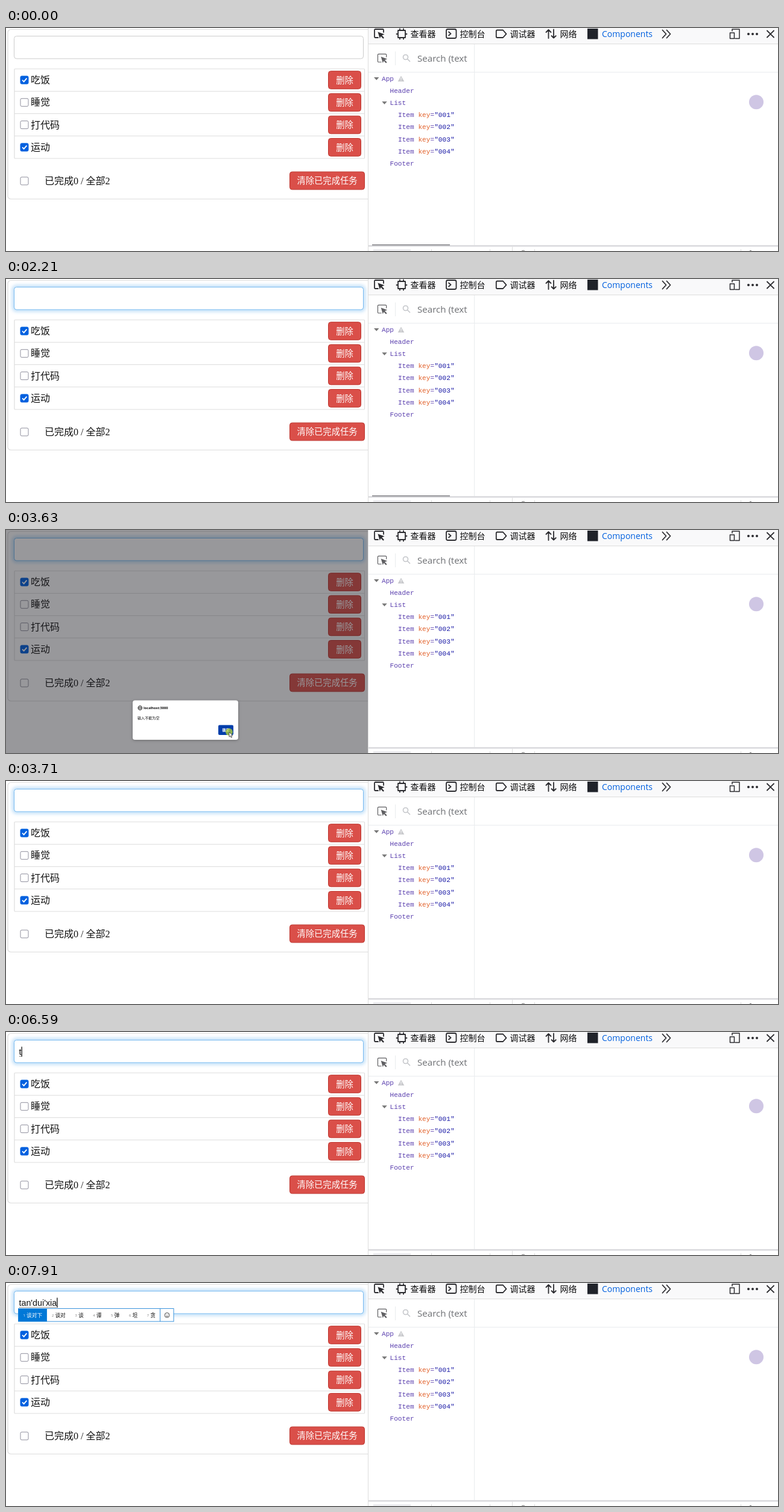
Animation, 1280 px wide and 371 px high, one loop 8000 ms. Source, as an HTML page:

```html
<!DOCTYPE html>
<html lang="zh">
<head>
<meta charset="utf-8">
<title>Todo list</title>
<style>
html, body { margin: 0; width: 100%; height: 100%; overflow: hidden; background: #fff; }
svg { display: block; }
text { white-space: pre; }
.page { font: 16px "Liberation Serif", "Noto Sans CJK SC", "Noto Sans CJK", serif; fill: #111; }
.ui { font: 14px "Open Sans", "Noto Sans CJK SC", "Noto Sans CJK", sans-serif; fill: #0c0c0d; }
.tree { font: 11.15px "Liberation Mono", monospace; fill: #5a3fae; }
.typed { font: 14.3px "Liberation Sans", sans-serif; fill: #111; }
.btn { fill: #da4f49; stroke: #bd362f; }
.btnText { font-size: 14.3px; fill: #fff; text-anchor: middle; }
.line { fill: none; stroke: #ddd; }
.icon { fill: none; stroke: #2b2b2f; stroke-width: 1.8; stroke-linejoin: round; stroke-linecap: round; }
.small { font-size: 6.1px; }
.cand { font-size: 8.7px; }
.num { font-size: 5.6px; }
</style>
</head>
<body>
<svg id="stage" width="1280" height="371" viewBox="0 0 1280 371">
  <defs>
    <filter id="glow" x="-5%" y="-50%" width="110%" height="200%"><feGaussianBlur stdDeviation="3"/></filter>
    <filter id="shadow" x="-10%" y="-20%" width="120%" height="150%"><feDropShadow dx="0" dy="1" stdDeviation="2.5" flood-opacity=".3"/></filter>
    <path id="picker" d="M7 15H2.5Q1 15 1 13.5V2.5Q1 1 2.5 1H14.500Q16 1 16 2.500V6" />
    <path id="pointer" d="M6.500 5.500L17.500 9.500 13.200 11.200 17 15.200 15.300 16.800 11.500 12.800 9.800 16.500Z" />
  </defs>

  <g id="page" class="page">
    <rect class="line" x="3" y="2.500" width="640" height="282" rx="5" style="stroke-width:1.200"/>
    <rect id="halo" x="13" y="13" width="580" height="38.500" rx="4" fill="none" stroke="#52a8ec" stroke-width="3" opacity="0" filter="url(#glow)"/>
    <rect id="field" x="13.500" y="13.500" width="579" height="37.500" rx="4" fill="#fff" stroke="#ccc"/>
    <rect class="line" x="14" y="68" width="580.500" height="149" rx="1" style="stroke-width:1.200"/>
    <path class="line" d="M14 105.300H594M14 142.500H594M14 179.700H594"/>
    <text x="64" y="259.500">已完成0 / 全部2</text>
  </g>
  <rect id="selection" x="22" y="23.500" width="28" height="17.500" fill="#0078d7"/>
  <text id="typed" class="typed" x="21.500" y="38"></text>
  <path id="underline" stroke="#333" stroke-dasharray="1 1"/>
  <rect id="caret" y="24.500" width="1.300" height="16.500" fill="#111"/>
  <g id="ime" class="ui"></g>

  <g id="modal" class="ui">
    <rect width="601" height="371" fill="#1c1b22" opacity=".45"/>
    <rect x="210" y="283.500" width="175" height="65.500" rx="4" fill="#fff" filter="url(#shadow)"/>
    <g fill="none" stroke="#222" stroke-width=".8">
      <circle cx="222.300" cy="296" r="3.500"/><ellipse cx="222.300" cy="296" rx="1.600" ry="3.500"/><path d="M218.800 296h7"/>
    </g>
    <text x="228" y="298.200" font-weight="700" style="font-size:5.700px">localhost:3000</text>
    <text class="small" x="218" y="315.300">输入不能为空</text>
    <rect id="ok" x="352" y="324.500" width="25" height="16.500" rx="2"/>
    <text class="small" x="364.500" y="335.200" text-anchor="middle" font-weight="700" style="fill:#fff">确定</text>
  </g>

  <g id="tools" class="ui">
    <rect x="601" width="679" height="371" fill="#fff"/>
    <rect x="601" width="679" height="26" fill="#f9f9fa"/>
    <path class="line" d="M601 26.500H1280M600.500 0V371"/>
    <path d="M601 73.500H1280M776.500 27V361M645.500 39V62" fill="none" stroke="#e9ebee"/>
    <path d="M601 362.500H1280" stroke="#d9d9dc" stroke-width="2.400"/>
    <rect x="609" y="368" width="62" height="3" fill="#ededf0"/>
    <path class="line" d="M705.500 368V371M802.500 368V371M876.500 368V371M1218.500 368V371M839.500 364V371"/>
    <path d="M855 371q2.500-2 5 0M1233 370.500h3" fill="none" stroke="#777"/>
    <rect id="scroll" x="607" y="360" width="129" height="1.600" fill="#85858a"/>

    <g transform="translate(610 1)"><use href="#picker" class="icon"/><use href="#pointer" fill="#2b2b2f"/></g>
    <g transform="translate(615.500 42.500) scale(.95)" opacity=".75"><use href="#picker" class="icon" style="stroke-width:1.300"/><use href="#pointer" fill="#2b2b2f"/></g>
    <g class="icon">
      <path d="M650 4H662V16H650ZM653 4V1.500M659 4V1.500M653 16V18.500M659 16V18.500M650 10H647.500M662 10H664.500"/>
      <rect x="730" y="2" width="16.500" height="15" rx="2.500"/><path d="M734 6.500L737.500 9.500 734 12.500"/>
      <path d="M814.500 3.500H824L829.500 9.800 824 16H814.500Q812.800 16 812.800 14.300V5.200Q812.800 3.500 814.500 3.500Z"/>
      <path d="M899.500 17V3M895.500 7L899.500 3 903.500 7M908 2.500V16.500M904.500 13L908 16.500 911.800 13"/>
      <path d="M1088.500 3.500L1094.500 10 1088.500 16.500M1095.500 3.500L1101.500 10 1095.500 16.500"/>
      <path d="M1204 5V2H1216V17.500H1209M1200.500 8H1207.500V17.500H1200.500Z" stroke-width="1.500"/>
      <path d="M1262 4.500L1273 15.500M1273 4.500L1262 15.500"/>
    </g>
    <g fill="#2b2b2f"><circle cx="1231" cy="10" r="2"/><circle cx="1238" cy="10" r="2"/><circle cx="1245" cy="10" r="2"/></g>
    <rect x="964" y="1" width="17.500" height="17.500" fill="#20232a"/>
    <circle cx="1244" cy="123.300" r="12" fill="#cfc6e4"/>
    <text x="670.500" y="15">查看器</text>
    <text x="752.500" y="15">控制台</text>
    <text x="835.500" y="15">调试器</text>
    <text x="918.500" y="15">网络</text>
    <text x="988" y="15" style="fill:#0060df">Components</text>
    <g fill="none" stroke="#c4c6ca" stroke-width="1.600"><circle cx="662.500" cy="48.500" r="4"/><path d="M665.500 51.500L670 56"/></g>
    <text x="682" y="56" style="font-size:15.100px;fill:#6d6f73">Search (text</text>
    <path d="M610 82H618.500L614.300 86.700ZM623.300 122.200H631.800L627.500 126.900Z" fill="#777"/>
    <path d="M655 79.500L660.300 89H649.700Z" fill="#c9cacd"/><path d="M655 82.500V86M655 87V88" stroke="#fff"/>
  </g>

  <circle id="click" r="6" fill="#b5d334" opacity=".75"/>
  <g id="mouse">
    <path id="arrow" d="M0 0V8.200L2 6.500 3.300 9.500 4.600 8.900 3.300 6H5.800Z" fill="#fff" stroke="#333" stroke-width=".8"/>
    <path id="beam" d="M-1.700 -4.300H1.700M0 -4.300V4.300M-1.700 4.300H1.700" fill="none" stroke="#333" stroke-width=".9"/>
  </g>
</svg>
<script>
const $ = id => document.getElementById(id);
const add = (parent, markup) => $(parent).insertAdjacentHTML('beforeend', markup);
const show = (id, on) => { $(id).style.display = on ? '' : 'none'; };
const set = (id, attrs) => { for (const k in attrs) $(id).setAttribute(k, attrs[k]); };

// Static todo list and component tree
function checkbox(cy, on) {
  add('page', `<rect x="24" y="${cy - 6.5}" width="13" height="13" rx="2" fill="${on ? '#0060df' : '#fff'}" stroke="${on ? '#0060df' : '#8f8f9d'}"/>` +
    (on ? `<path d="M27 ${cy}l2.600 2.800 4.800-5.600" fill="none" stroke="#fff" stroke-width="1.800"/>` : ''));
}
function button(x, cy, width, label) {
  add('page', `<rect class="btn" x="${x}" y="${cy - 14.8}" width="${width}" height="29.600" rx="4"/>
    <text class="ui btnText" x="${x + width / 2}" y="${cy + 5.3}" style="font-size:14.300px;fill:#fff">${label}</text>`);
}
['吃饭', '睡觉', '打代码', '运动'].forEach((name, i) => {
  const cy = 86.5 + i * 37.3;
  checkbox(cy, i % 3 === 0);
  add('page', `<text x="41" y="${cy + 5.5}">${name}</text>`);
  button(534.5, cy, 54, '删除');
});
checkbox(254.5, false);
button(470.5, 254, 124, '清除已完成任务');

const item = n => `Item <tspan fill="#e2622c">key</tspan>=<tspan fill="#1a1aa6">"00${n}"</tspan>`;
[[623, 'App'], [636.5, 'Header'], [636.5, 'List'], ...[1, 2, 3, 4].map(n => [650, item(n)]), [636.5, 'Footer']]
  .forEach(([x, label], i) => add('tools', `<text class="tree" x="${x}" y="${88 + i * 20.1}">${label}</text>`));

// Typing: start time, composed text, candidates
const typing = [
  [6590, 't', ''],
  [6670, 'ta', '他 她 它 塔 踏 太 天'],
  [6760, 'tan', '谈 弹 探 谭 坦 摊 贪'],
  [7340, "tan'd", '谈到 弹道 探店 坦荡 谈 弹 探'],
  [7420, "tan'du", '谈度 弹都 谈 谭 弹 坦 贪'],
  [7500, "tan'dui", '谈对 谈 谭 弹 坦 贪 探'],
  [7670, "tan'dui'x", '谈对象 谈对 谈 谭 弹 坦 贪'],
  [7750, "tan'dui'xi", '谈对戏 谈对 谈 谭 弹 坦 贪'],
  [7840, "tan'dui'xia", '谈对下 谈对 谈 谭 弹 坦 贪']
];

function imeMarkup(words) {
  let x = 20.5, cells = '';
  words.split(' ').forEach((word, i) => {
    const width = 21 + 8.8 * word.length;
    if (!i) cells += `<rect x="${x}" y="43" width="${width}" height="21" fill="#0078d7"/>`;
    cells += `<text class="num" x="${x + 8}" y="56" style="fill:${i ? '#777' : '#fff'}">${i + 1}</text>
      <text class="cand" x="${x + 13.5}" y="57" style="fill:${i ? '#111' : '#fff'}">${word}</text>`;
    x += width;
  });
  return `<rect x="20.500" y="42.500" width="${x + 2}" height="21.500" fill="#fff" stroke="#3a93dc"/>${cells}
    <path d="M${x} 43V64" stroke="#3a93dc"/>
    <g transform="translate(${x + 11.5} 53.500)" fill="none" stroke="#222" stroke-width=".8">
    <circle r="4"/><path d="M-2 1Q0 3.500 2 1M-1.500-1.600v.9M1.500-1.600v.9"/></g>`;
}

function travel(t, start, end, steps, [x0, y0], [x1, y1]) {
  const p = Math.min(1, Math.floor((t - start) / (end - start) * steps + 1e-6) / steps);
  const e = p * p * (3 - 2 * p);
  return [x0 + (x1 - x0) * e, y0 + (y1 - y0) * e];
}
const inField = [279, 30], onButton = [370, 336], nearText = [58, 31];
function pointerAt(t) {
  if (t < 230 || t >= 1380 && t < 1960 || t >= 3710 && t < 3790 || t >= 4750) return null;
  if (t < 2130) return travel(t, 230, 960, 9, [1236, 361], inField);
  if (t < 3710) return travel(t, 2950, 3550, 7, inField, onButton);
  if (t < 4670) return travel(t, 3790, 4590, 10, [358, 324], nearText);
  return [13, 31];
}

let shownWords = null;
function draw(t) {
  const between = (a, b) => t >= a && t < b;
  const focus = Math.max(0, Math.min(1, Math.floor((t - 1040) / 85 + 1) / 3));
  set('halo', { opacity: focus * .75 });
  set('field', { stroke: focus ? `rgb(${204 - 87 * focus},${204 - 19 * focus},${204 + 36 * focus})` : '#ccc' });

  const modal = between(2300, 3710);
  show('modal', modal);
  set('ok', { fill: t >= 3630 ? '#003eaa' : t >= 3470 ? '#0250bb' : '#0061e0' });
  show('scroll', t < 3200);
  show('selection', between(4670, 4750));

  const [, text, words] = typing.findLast(s => t >= s[0]) || [0, '', ''];
  $('typed').textContent = text;
  const end = text ? 21.5 + $('typed').getComputedTextLength() : 0;
  set('underline', { d: text ? `M22 40.500H${end}` : '' });
  if (words !== shownWords) {
    $('ime').innerHTML = words ? imeMarkup(words) : '';
    shownWords = words;
  }
  const caretX = text ? end : t < 1460 ? 35 : t < 1630 ? 39.3 : 48.5;
  set('caret', { x: caretX });
  show('caret', text ? !between(7170, 7340) : between(1380, 1630) || between(1790, 2130));

  const pos = pointerAt(t);
  show('mouse', pos);
  show('click', pos && (between(1040, 1130) || between(3550, 3710) || between(4670, 4750)));
  if (!pos) return;
  const [x, y] = pos;
  const beam = x < 592 && y > 14 && y < 51 && !between(2130, 3710);
  set('mouse', { transform: `translate(${x} ${y})` });
  set('click', { cx: x, cy: y });
  show('beam', beam);
  show('arrow', !beam);
}
function loop() {
  draw(performance.now() % 8000);
  requestAnimationFrame(loop);
}
loop();
</script>
</body>
</html>
```
